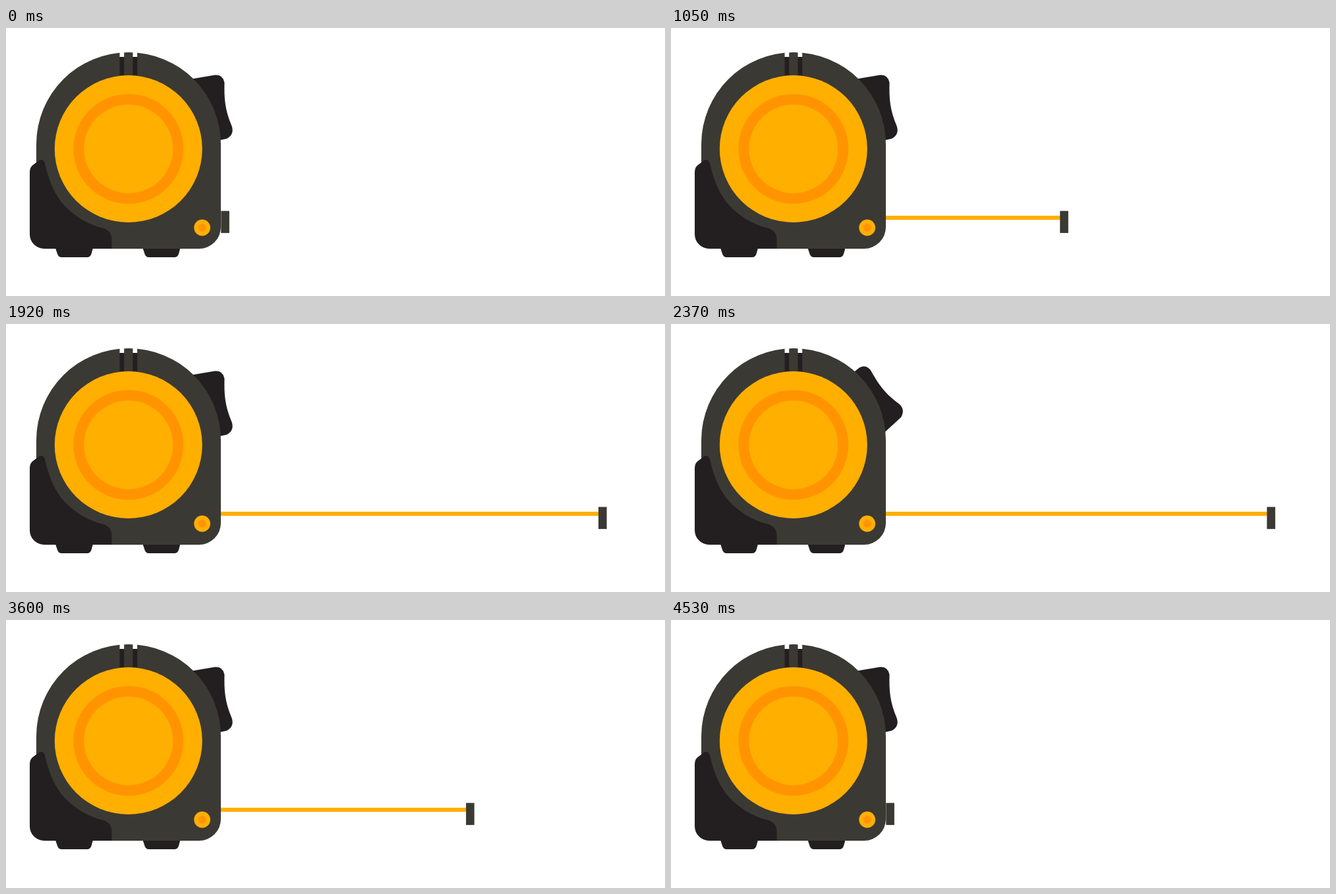
These frames come from a looping animation (1000 px wide and 408 px high, 4.56 s). An HTML page with a canvas:

```html
<!DOCTYPE html>
<html lang="en">
<head>
<meta charset="utf-8">
<title>Tape measure</title>
<style>
html, body { margin: 0; width: 100%; height: 100%; overflow: hidden; background: #fff; }
canvas { display: block; width: 1000px; height: 408px; }
</style>
</head>
<body>
<canvas id="stage"></canvas>
<script>
const W = 1000, H = 408, LOOP = 4560, STEP = 30;
const BODY = '#3b3934', DARK = '#231f20', YELLOW = '#ffaf00', ORANGE = '#ff9400';
const REACH = 578;

const canvas = document.getElementById('stage');
const ctx = canvas.getContext('2d');
const scale = window.devicePixelRatio || 1;
canvas.width = W * scale;
canvas.height = H * scale;

const trigger = new Path2D('M270 79.5 L316 71.7 Q329 70 331.5 83 C331 107 332 124 342.5 149 Q347 162 335 168.5 L300 176 Z');
const shell = new Path2D('M46 177 A140 140 0 0 1 326 177 V303 A33 33 0 0 1 293 336 H60 L46 322 Z');
const grip = new Path2D('M36 219 Q36 211 43 207 L50 201.5 Q56.5 199 59 206 C66 238 77 259 92 274 C111 292 131 301 147 304.5 Q160.5 309 160.5 322 V336 H58 A22 22 0 0 1 36 314 Z');
const foot = new Path2D('M0 335 L3 344 Q4.5 349 9.5 349 H48 Q53 349 54.5 344 L57 335 Z');

// Eased progress between two times, with Bezier handles (x1, 0) and (x2, 1).
function ease(t, from, to, x1 = 1 / 3, x2 = 5 / 6) {
  const x = (t - from) / (to - from);
  if (x <= 0) return 0;
  if (x >= 1) return 1;
  let lo = 0, hi = 1;
  for (let i = 0; i < 24; i++) {
    const u = (lo + hi) / 2, v = 1 - u;
    if (3 * v * v * u * x1 + 3 * v * u * u * x2 + u * u * u < x) lo = u;
    else hi = u;
  }
  return lo * lo * (3 - 2 * lo);
}

function fill(path, color) {
  ctx.fillStyle = color;
  ctx.fill(path);
}

function rect(x, y, w, h, color) {
  ctx.fillStyle = color;
  ctx.fillRect(x, y, w, h);
}

function disc(x, y, r, color) {
  ctx.beginPath();
  ctx.arc(x, y, r, 0, Math.PI * 2);
  ctx.fillStyle = color;
  ctx.fill();
}

function turn(x, y, degrees) {
  ctx.translate(x, y);
  ctx.rotate(degrees * Math.PI / 180);
  ctx.translate(-x, -y);
}

function drawTape(length) {
  if (length > 0) rect(320, 285.8, length + 7, 6.2, YELLOW);
  rect(326.3 + length, 278.5, 12.6, 33.6, BODY);
}

function drawTrigger(press) {
  ctx.save();
  turn(293.4, 129.4, -30.5 * press);
  fill(trigger, DARK);
  ctx.restore();
}

function drawCase() {
  for (const x of [75, 207.5]) {
    ctx.save();
    ctx.translate(x, 0);
    fill(foot, DARK);
    ctx.restore();
  }
  fill(shell, BODY);
  for (const x of [172.5, 192.5]) {
    rect(x, 35, 6.7, 9, '#fff');
    rect(x, 44, 6.7, 32, DARK);
  }
  fill(grip, DARK);
  disc(185.8, 184, 112, YELLOW);
  disc(185.8, 184, 83.5, ORANGE);
  disc(185.8, 184, 67.5, YELLOW);
  disc(297.7, 304, 12.4, YELLOW);
  disc(297.7, 304, 6, ORANGE);
}

function draw(t) {
  const pull = ease(t, 0, 1982) - ease(t, 3300, 3900, 0.4, 0.9);
  const press = ease(t, 1980, 2140) - ease(t, 3260, 3420);
  const kick = ease(t, 3830, 3930) - ease(t, 3930, 4200);

  ctx.setTransform(scale, 0, 0, scale, 0, 0);
  rect(0, 0, W, H, '#fff');
  turn(179, 193, 4 * kick);
  drawTape(REACH * pull);
  drawTrigger(press);
  drawCase();
}

const start = performance.now();

function tick() {
  const t = (performance.now() - start) % LOOP;
  draw(Math.floor(t / STEP) * STEP);
  requestAnimationFrame(tick);
}

tick();
</script>
</body>
</html>
```
